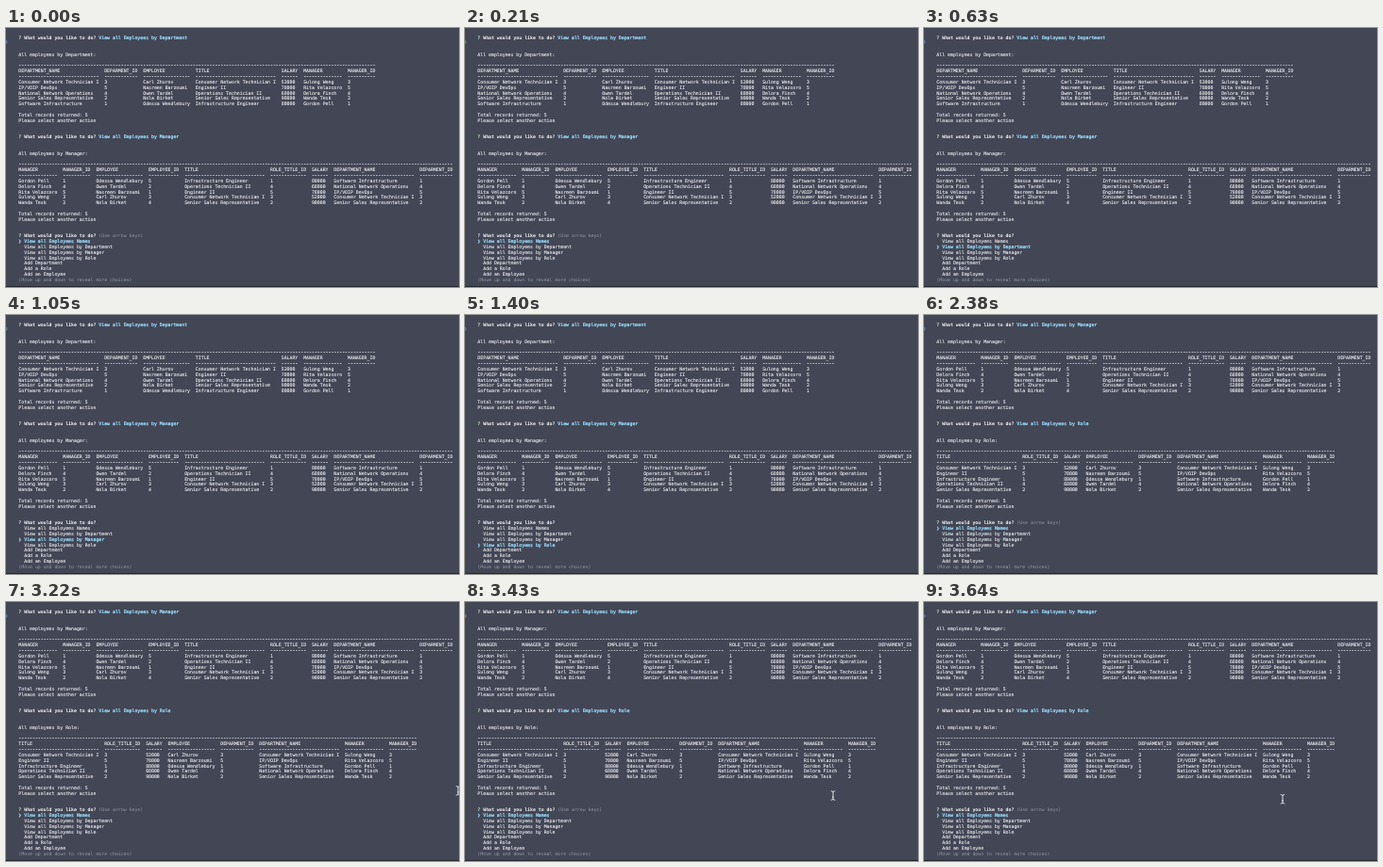
An HTML page that plays this animation: 480 by 275 pixels, repeating every 3.71 s.

```html
<!DOCTYPE html>
<html lang="en">
<head>
<meta charset="utf-8">
<title>Employee terminal</title>
<style>
  html, body { margin: 0; width: 100%; height: 100%; overflow: hidden; background: #434655; }
  svg { display: block; width: 100vw; height: 100vh; }
  text {
    font: 10px "DejaVu Sans Mono", "Liberation Mono", monospace;
    white-space: pre;
    text-rendering: geometricPrecision;
    fill: currentColor;
    stroke: currentColor;
    stroke-width: .2;
    color: #eff0f3;
  }
  .bold { font-weight: bold; color: #f8f8fa; stroke: none; }
  .mark { font-weight: bold; color: #b4e8c0; }
  .cyan { color: #9ce0ff; stroke-width: .5; }
  .dim { color: #969aa6; stroke: none; }
  .rule { color: #e6e7eb; stroke-width: .6; }
</style>
</head>
<body>
<svg id="stage" viewBox="0 0 480 275" preserveAspectRatio="none"></svg>
<script>
const LOOP = 3710, STEP = 70;
const LEFT = 13.35, CELL = 2.93, PITCH = 5.835, BASE = 12.25;
const SCALE = CELL / 6.02;
const stage = document.getElementById("stage");

function add(parent, tag, attrs = {}, content = "") {
  const el = document.createElementNS("http://www.w3.org/2000/svg", tag);
  for (const key in attrs) el.setAttribute(key, attrs[key]);
  el.textContent = content;
  return parent.appendChild(el);
}

function print(parent, row, col, str, cls = "") {
  const x = LEFT + col * CELL, y = BASE + row * PITCH;
  return add(parent, "text", { class: cls, transform: `translate(${x} ${y}) scale(${SCALE})` }, str);
}

const rule = (parent, row, col, length) => print(parent, row, col, "-".repeat(length), "rule");

const fields = ["employee", "title", "salary", "department", "manager", "id"];
const staff = [
  ["Carl Zhurov", "Consumer Network Technician I", "52000", "Consumer Network Technician I", "Sulong Weng", "3"],
  ["Nasreen Barzoumi", "Engineer II", "78000", "IP/VOIP DevOps", "Rita Velazcoro", "5"],
  ["Owen Tardel", "Operations Technician II", "68000", "National Network Operations", "Delora Finch", "4"],
  ["Nola Birket", "Senior Sales Representative", "90000", "Senior Sales Representative", "Wanda Tesk", "2"],
  ["Odessa Wendlebury", "Infrastructure Engineer", "80000", "Software Infrastructure", "Gordon Pell", "1"]
].map(values => Object.fromEntries(fields.map((f, i) => [f, values[i]])));

// Every ID column shows the record's own number, except the employee ID.
const employeeIds = { 1: "5", 2: "4", 3: "3", 4: "2", 5: "1" };
staff.forEach(s => s.employeeId = employeeIds[s.id]);

const columns = {
  employee: "EMPLOYEE", title: "TITLE", salary: "SALARY",
  department: "DEPARTMENT_NAME", manager: "MANAGER"
};
const reports = {
  Department: {
    order: [3, 5, 4, 2, 1],
    cols: ["department", "DEPARMENT_ID", "employee", "title", "salary", "manager", "MANAGER_ID"]
  },
  Manager: {
    order: [1, 4, 5, 3, 2],
    cols: ["manager", "MANAGER_ID", "employee", "EMPLOYEE_ID", "title", "ROLE_TITLE_ID", "salary", "department", "DEPARMENT_ID"]
  },
  Role: {
    order: [3, 5, 1, 4, 2],
    cols: ["title", "ROLE_TITLE_ID", "salary", "employee", "DEPARMENT_ID", "department", "manager", "MANAGER_ID"]
  }
};

function cellText(person, col) {
  if (col === "EMPLOYEE_ID") return person.employeeId;
  return columns[col] ? person[col] : person.id;
}

function prompt(parent, row) {
  print(parent, row, 0, "?", "mark");
  print(parent, row, 2, "What would you like to do?", "bold");
}

function report(parent, row, name) {
  const { order, cols } = reports[name];
  const people = order.map(id => staff.find(s => s.id === String(id)));
  prompt(parent, row);
  print(parent, row, 29, "View all Employees by " + name, "cyan");
  print(parent, row + 3, 0, `All employees by ${name}:`);

  let at = 0;
  for (const col of cols) {
    const head = columns[col] || col;
    const cells = people.map(p => cellText(p, col));
    const width = Math.max(head.length, ...cells.map(c => c.length));
    print(parent, row + 6, at, head);
    rule(parent, row + 7, at, width);
    cells.forEach((c, i) => print(parent, row + 8 + i, at, c));
    at += width + 2;
  }
  rule(parent, row + 5, 0, at - 2);
  print(parent, row + 14, 0, "Total records returned: 5");
  print(parent, row + 15, 0, "Please select another action");
}

add(stage, "rect", { width: 480, height: 275, fill: "#434655" });
add(stage, "rect", { y: 274, width: 480, height: 1, fill: "#24262e" });
add(stage, "circle", { cx: -.8, cy: 14.8, r: 1.8, fill: "none", stroke: "#6b9cda", "stroke-width": .8 });

const before = add(stage, "g"), after = add(stage, "g");
report(before, 0, "Department");
report(before, 18, "Manager");
report(after, 0, "Manager");
report(after, 18, "Role");

prompt(stage, 36);
const hint = print(stage, 36, 29, "(Use arrow keys)", "dim");
const choices = [
  "View all Employees Names", "View all Employees by Department",
  "View all Employees by Manager", "View all Employees by Role",
  "Add Department", "Add a Role", "Add an Employee"
].map((label, i) => print(stage, 37 + i, 2, label));
const arrows = choices.map((_, i) => print(stage, 37 + i, 0, "❯", "cyan"));
print(stage, 44, 0, "(Move up and down to reveal more choices)", "dim");

const pointer = add(stage, "path", {
  d: "M-2.2-4.8Q0-4.8 0-3.4Q0-4.8 2.2-4.8M0-3.4V3.4M-2.2 4.8Q0 4.8 0 3.4Q0 4.8 2.2 4.8M-1 1.6H1",
  fill: "none", stroke: "#eeeef2", "stroke-width": .9
});

const SWITCH = 2380, ENTER = 3220;
const presses = [490, 980, 1260];
const path = [[479, 200.3], [452, 201], [418, 203], [390, 205.5], [374, 208], [373, 209.5], [380, 209.3]];

const show = (el, on) => el.setAttribute("visibility", on ? "visible" : "hidden");

function draw(t) {
  const switched = t >= SWITCH;
  const selected = switched ? 0 : presses.filter(p => t >= p).length;
  show(before, !switched);
  show(after, switched);
  show(hint, selected === 0);
  choices.forEach((el, i) => {
    el.setAttribute("class", i === selected ? "cyan" : "");
    show(arrows[i], i === selected);
  });

  show(pointer, t >= ENTER);
  const i = Math.max(0, Math.min(path.length - 1, Math.floor((t - ENTER) / STEP)));
  pointer.setAttribute("transform", `translate(${path[i]})`);
}

const start = performance.now();
function tick() {
  draw((performance.now() - start) % LOOP);
  requestAnimationFrame(tick);
}
draw(0);
requestAnimationFrame(tick);
</script>
</body>
</html>
```
